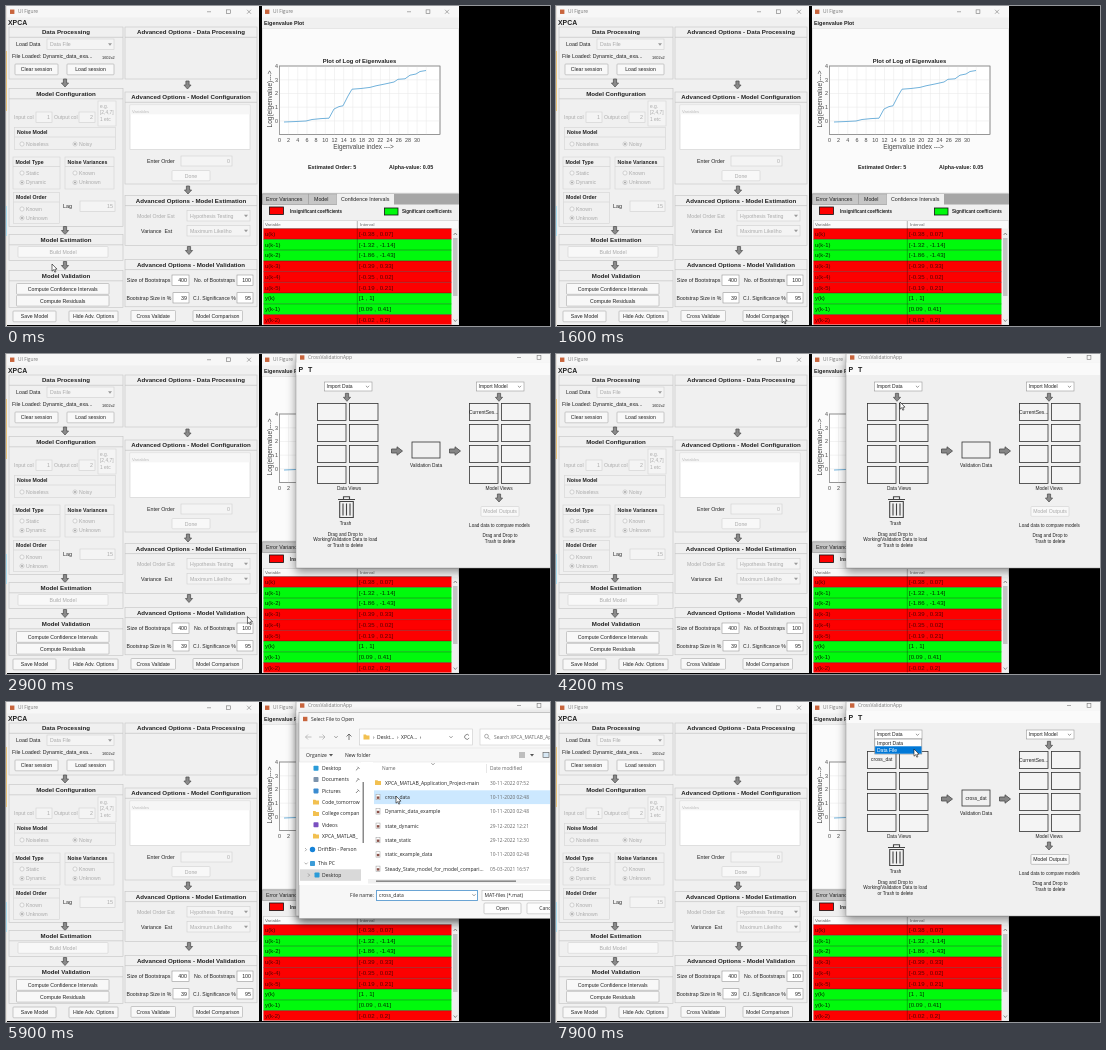
Write an HTML page that moves like this. It is 544x320 px and loops after 8 s.

```html
<!DOCTYPE html>
<html lang="en">
<head>
<meta charset="utf-8">
<title>Model comparison walkthrough</title>
<style>
  html, body { margin: 0; width: 100%; height: 100%; overflow: hidden; background: #000; }
  svg { display: block; width: 100vw; height: 100vh; }
  text { font-family: "Liberation Sans", Arial, sans-serif; white-space: pre; }
  .ui { font-family: "Open Sans", "Noto Sans", sans-serif; }
  .shadow { filter: drop-shadow(0 4px 5px rgba(0, 0, 0, .42)); }
</style>
</head>
<body>
<svg id="stage" viewBox="0 0 544 320"></svg>
<script>
const INK = '#222', DIM = '#aaa', EDGE = '#c4c4c4', FACE = '#f0f0f0';

// Drawing helpers: text is placed by its vertical centre.
const rect = (x, y, w, h, fill = 'none', stroke = 'none', sw = 0.6, rx = 0) =>
  `<rect x="${x}" y="${y}" width="${w}" height="${h}" fill="${fill}" stroke="${stroke}" stroke-width="${sw}" rx="${rx}"/>`;
const path = (d, stroke = INK, fill = 'none', sw = 0.7) =>
  `<path d="${d}" stroke="${stroke}" fill="${fill}" stroke-width="${sw}"/>`;
const text = (s, x, y, { size = 5.3, fill = INK, anchor = 'start', bold = false, ui = false } = {}) =>
  `<text x="${x}" y="${y + size * 0.36}" font-size="${size}" fill="${fill}" text-anchor="${anchor}"` +
  `${bold ? ' font-weight="700"' : ''}${ui ? ' class="ui"' : ''}>${s.replace(/&/g, '&amp;').replace(/</g, '&lt;').replace(/>/g, '&gt;')}</text>`;
const mid = (s, x, y, o = {}) => text(s, x, y, { anchor: 'middle', ...o });
const bold = (s, x, y, size = 5.4) => text(s, x, y, { size, bold: true });
const group = (id, body) => `<g id="${id}" display="none">${body}</g>`;

const triangle = (x, y, fill = '#999') => path(`M${x - 2} ${y - 1}h4l-2 2.6z`, 'none', fill);
const chevron = (x, y) => path(`M${x - 1.6} ${y - 0.8}l1.6 1.6 1.6 -1.6`, '#555', 'none', 0.6);
const downArrow = (x, y) => path(`M${x - 1.6} ${y - 4}h3.2v4h2l-3.6 4 -3.6 -4h2z`, '#4a4a4a', '#8a8a8a', 0.7);
const rightArrow = (x, y) => path(`M${x - 5.5} ${y - 2}h5.5v-2.2l5.5 4.2 -5.5 4.2v-2.2h-5.5z`, '#4a4a4a', '#858585', 0.8);

const button = (s, x, y, w, h = 10.8, fill = INK) =>
  rect(x, y, w, h, '#f8f8f8', fill === DIM ? '#d2d2d2' : '#aaa', 0.6, 0.8) + mid(s, x + w / 2, y + h / 2, { size: 5.2, fill });
const field = (s, x, y, w, h = 10.3, fill = INK) =>
  rect(x, y, w, h, fill === DIM ? '#f4f4f4' : '#fff', fill === DIM ? '#d0d0d0' : '#999') +
  text(s, x + w - 2, y + h / 2, { anchor: 'end', fill });
const disabledMenu = (s, x, y, w, h = 10.5) =>
  rect(x, y, w, h, '#f4f4f4', '#d0d0d0') + text(s, x + 3, y + h / 2, { size: 5.2, fill: DIM }) + triangle(x + w - 4, y + h / 2);
const radio = (s, x, y, on) =>
  `<circle cx="${x}" cy="${y}" r="2.1" fill="#f6f6f6" stroke="#bbb" stroke-width=".6"/>` +
  (on ? `<circle cx="${x}" cy="${y}" r="1.1" fill="#aaa"/>` : '') + text(s, x + 4, y, { size: 5.2, fill: DIM });
const panel = (title, x, y, w, h) =>
  rect(x, y, w, h, 'none', EDGE) + path(`M${x} ${y + 10.3}h${w}`, EDGE) +
  mid(title, x + w / 2, y + 5.2, { size: 6.15, bold: true });
const box = (title, x, y, w, h) =>
  rect(x, y, w, h, 'none', '#d4d4d4') + path(`M${x} ${y + 9.5}h${w}`, '#d4d4d4') + bold(title, x + 2.5, y + 5, 5.2);

const titleBar = (s, x, y, w, h, buttons) => {
  const c = y + h / 2;
  const [a, b, z] = buttons;
  return rect(x, y, w, h, '#f7f7f7') + rect(x + 3, c - 2.2, 4.4, 4.4, '#c8643c') +
    text(s, x + 11, c, { size: 4.85, fill: '#777', ui: true }) +
    path(`M${a - 2} ${c}h4`, '#777', 'none', 0.6) + rect(b - 1.9, c - 1.9, 3.8, 3.8, 'none', '#777') +
    path(`M${z - 2} ${c - 2}l4 4m0 -4l-4 4`, '#777', 'none', 0.6);
};

const desktopEdge = () => rect(0, 0, 1, 320, '#e6e2dc') + rect(0, 45, 1, 60, '#e8c27a') + rect(0, 200, 1, 30, '#a9dcee');

function optionsWindow() {
  const dim = { size: 5.2, fill: DIM };
  return rect(1, 0, 252, 319, FACE) + titleBar('UI Figure', 1, 0, 252, 11.5, [203, 222.5, 243]) +
    bold('XPCA', 2, 17, 6.9) +
    panel('Data Processing', 3, 21, 114, 52) +
    text('Load Data', 10, 38) + disabledMenu('Data File', 41, 33, 67) +
    text('File Loaded: Dynamic_data_exa...', 6, 50.5) + text('1602x2', 96, 51.5, { size: 3.9 }) +
    button('Clear session', 9, 58, 43) + button('Load session', 61, 58, 47) + downArrow(59, 77) +

    panel('Model Configuration', 3, 82.5, 114, 138) +
    text('Input col', 8, 111, dim) + field('1', 30, 106, 16, 10.3, DIM) +
    text('Output col', 48, 111, dim) + field('2', 73, 106, 16, 10.3, DIM) +
    rect(92, 95, 18, 25, '#f4f4f4', '#d4d4d4') +
    ['e.g.', '[2,4,7]', '1 etc'].map((s, i) => text(s, 94, 100 + i * 6.5, { size: 4.9, fill: DIM })).join('') +
    box('Noise Model', 8.5, 121.5, 101, 22) + radio('Noiseless', 16, 138) + radio('Noisy', 69, 138, true) +
    box('Model Type', 7, 151, 47, 32) + radio('Static', 16, 167) + radio('Dynamic', 16, 176.5, true) +
    box('Noise Variances', 59, 151, 49, 32) + radio('Known', 69, 167) + radio('Unknown', 69, 176.5, true) +
    box('Model Order', 7.5, 186.5, 46, 31) + radio('Known', 16, 203) + radio('Unknown', 16, 212, true) +
    text('Lag', 57, 200) + field('15', 74, 195, 35, 10.5, DIM) + downArrow(59, 224.5) +

    panel('Model Estimation', 3, 228.5, 114, 26) + button('Build Model', 12, 240.5, 90, 10.8, DIM) + downArrow(59, 259.5) +
    panel('Model Validation', 3, 264.5, 114, 37) +
    button('Compute Confidence Intervals', 10.5, 277.5, 92.5) + button('Compute Residuals', 10.5, 289.3, 92.5) +
    button('Save Model', 7, 305, 43) + button('Hide Adv. Options', 63, 305, 49) +

    panel('Advanced Options - Data Processing', 119, 21, 132, 52) + downArrow(181.5, 79) +
    panel('Advanced Options - Model Configuration', 119, 86, 132, 92) +
    rect(124, 99, 120, 44.5, '#fff', '#d0d0d0') + rect(124.3, 99.3, 119.4, 9, '#f6f6f6') + text('Variables', 126, 105, { size: 4.2, fill: '#bbb' }) +
    text('Enter Order', 141, 155) + field('0', 175, 150, 51, 10, DIM) +
    button('Done', 166, 164.5, 38, 10.3, DIM) + downArrow(182, 184) +
    panel('Advanced Options - Model Estimation', 119, 189.3, 132, 50) +
    text('Model Order Est', 131, 210, dim) + disabledMenu('Hypothesis Testing', 181, 204.5, 63) +
    text('Variance  Est', 135, 225) + disabledMenu('Maximum Likeliho', 181, 219.5, 63) + downArrow(183, 244.5) +
    panel('Advanced Options - Model Validation', 119, 253.3, 132, 47.5) +
    text('Size of Bootstraps', 120.8, 274, { size: 5.4 }) + field('400', 166, 269, 17) +
    text('No. of Bootstraps', 188, 274) + field('100', 231, 269, 16) +
    text('Bootstrap Size in %', 120.5, 292, { size: 5.15 }) + field('39', 167, 286.7, 16) +
    text('C.I. Significance %', 187, 292, { size: 5.1 }) + field('95', 231, 286.7, 16) +
    button('Cross Validate', 125, 304.5, 44.5) + button('Model Comparison', 187, 304.5, 49.5) +
    group('hover', rect(187, 304.5, 49.5, 10.8, '#cfe4f4', '#4a90c8', 0.7, 0.8) + mid('Model Comparison', 211.75, 309.9, { size: 5.2 }));
}

function plot() {
  const tickX = k => 273.4 + k * 4.59, tickY = v => 114.9 - v * 13.7;
  let s = rect(273.4, 60, 160.6, 68.6, '#fff', '#777', 0.5);
  for (let k = 0; k <= 32; k += 2) {
    s += path(`M${tickX(k)} 60v68.6`, '#e6e6e6', 'none', 0.5) + (k < 31 ? mid(`${k}`, tickX(k), 133.8, { size: 5.4, fill: '#444' }) : '');
  }
  for (let v = 0; v <= 4; v++) {
    s += path(`M273.4 ${tickY(v)}h160.6`, '#e6e6e6', 'none', 0.5) + text(`${v}`, 272, tickY(v), { size: 5.4, fill: '#444', anchor: 'end' });
  }
  const curve = 'M278 116L288 115.6 300 115 306 113.5 315 112.6 323 112.2 328 103 333 100.6 337 99.8 342 90 346 83.2 ' +
    '355 82.5 364 81.4 370 79.8 378 78.2 388 76 392 73.3 399 72.8 404 69.2 410 68 414 65.5 420 64.5';
  return s + rect(273.4, 60, 160.6, 68.6, 'none', '#777', 0.5) + path(curve, '#4f9fd2', 'none', 0.8) +
    mid('Plot of Log of Eigenvalues', 353.5, 55, { size: 5.85, bold: true }) +
    mid('Eigenvalue index --->', 357.5, 140.5, { size: 6.4, fill: '#444' }) +
    `<g transform="translate(264 93) rotate(-90)">${mid('Log(eigenvalue)--->', 0, 0, { size: 6.5, fill: '#444' })}</g>`;
}

function resultsWindow() {
  const rows = [
    ['u(k)', '[-0.38 , 0.07]', 0], ['u(k-1)', '[-1.32 , -1.14]', 1], ['u(k-2)', '[-1.86 , -1.43]', 1],
    ['u(k-3)', '[-0.39 , 0.33]', 0], ['u(k-4)', '[-0.35 , 0.02]', 0], ['u(k-5)', '[-0.19 , 0.21]', 0],
    ['y(k)', '[1 , 1]', 1], ['y(k-1)', '[0.09 , 0.41]', 1], ['y(k-2)', '[-0.02 , 0.2]', 0]];
  const table = rows.map(([name, range, good], i) => {
    const y = 222.6 + i * 10.75, h = Math.min(10.75, 318.5 - y), fill = good ? '#032803' : '#500';
    return rect(257.5, y, 188, h, good ? '#00fa0c' : '#fd0000') + path(`M257.5 ${y}h188`, '#0007', 'none', 0.7) +
      text(name, 259, y + 5.2, { size: 5.9, fill }) + text(range, 353, y + 5.2, { size: 6.1, fill });
  }).join('');
  return rect(256, 0, 197, 319, FACE) + titleBar('UI Figure', 256, 0, 197, 11.5, [403, 422, 441]) +
    bold('Eigenvalue Plot', 258, 17) + rect(256.5, 22.5, 196, 164.5, '#fbfbfb', '#ddd') + plot() +
    bold('Estimated Order: 5', 302, 161) + bold('Alpha-value: 0.05', 383, 161) +
    rect(256, 187.5, 197, 11, '#a6a6a6') + rect(256.5, 188, 46, 10.5, '#c6c6c6', '#999', 0.5) +
    rect(302.5, 188, 28.5, 10.5, '#c6c6c6', '#999', 0.5) + rect(331, 188, 57, 11, FACE) +
    text('Error Variances', 260, 193) + text('Model', 308, 193) + text('Confidence Intervals', 335, 193) +
    rect(263.5, 201, 14, 7.5, '#f00', '#111', 0.8) + bold('Insignificant coefficients', 284, 205, 4.45) +
    rect(378.5, 202, 13.5, 7, '#00f80c', '#111', 0.8) + bold('Significant coefficients', 396, 205.3, 4.55) +
    rect(257.5, 214.5, 195, 104, '#fafafa', '#ccc') + text('Variable', 259, 218.7, { size: 4.4, fill: '#666' }) +
    text('Interval', 354, 218.7, { size: 4.4, fill: '#666' }) + table + path('M351.3 215v103.5', '#0007', 'none', 0.6) +
    rect(446, 222.6, 6.5, 96, '#efefef') + rect(447, 232, 4.5, 58, '#c4c4c4') +
    path('M447.6 229l1.7 -2 1.7 2', '#666') + path('M447.6 313.5l1.7 2 1.7 -2', '#666');
}

const appFrame = () => `<g class="shadow">${rect(290, -1, 276, 215, FACE, '#999', 0.5)}</g>` +
  titleBar('CrossValidationApp', 291, -1.5, 275, 10, [513, 533, 553]);

function appContent() {
  const cells = x => [0, 1, 2, 3].map(r =>
    [0, 32].map(dx => rect(x + dx, 49.5 + r * 21, 28.5, 17, '#f4f4f4', '#333', 0.8)).join('')).join('');
  const menu = (s, x) => rect(x, 28, 47.5, 9, '#fff', '#999') + text(s, x + 2, 32.6, { size: 5 }) + chevron(x + 43, 32.6);
  const small = { size: 4.6 };
  const trash = path('M332 145.5h17M337.5 145.3v-2.6h6v2.6M333.7 147.5h13.6v16h-13.6zM337 149.5v12M340.5 149.5v12M344 149.5v12', '#444', 'none', 1.1);
  return rect(290.5, 8.5, 275, 12.5, '#fafafa') + bold('P', 292.5, 15, 7) + bold('T', 302, 15, 7) +
    menu('Import Data', 318.5) + menu('Import Model', 470.5) + downArrow(341, 43.3) + downArrow(493, 43.3) +
    cells(311.5) + cells(463.5) + mid('CurrentSes...', 477.7, 57.7, { size: 5 }) +
    rightArrow(391, 97) + rightArrow(449, 97) + rect(406, 88, 28, 16, FACE, '#333', 0.8) +
    mid('Validation Data', 420, 111, { size: 4.8 }) + mid('Data Views', 343, 134.5, { size: 4.8 }) + mid('Model Views', 493, 134.5, { size: 4.8 }) +
    trash + mid('Trash', 339.5, 169, small) +
    mid('Drag and Drop to', 339.3, 180, small) + mid('Working/Validation Data to load', 339.3, 185.7, small) + mid('or Trash to delete', 339.3, 191.3, small) +
    downArrow(493, 144) + button('Model Outputs', 475, 152.5, 38, 9.8, DIM) +
    mid('Load data to compare models', 493.5, 171.5, small) + mid('Drag and Drop to', 494, 181.5, small) + mid('Trash to delete', 494, 187.3, small) +
    group('loaded', mid('cross_dat', 325.7, 57.7, { size: 4.9 })) +
    group('validated', mid('cross_dat', 420, 96, { size: 4.9 }) + button('Model Outputs', 475, 152.5, 38, 9.8)) +
    group('popup', rect(318.8, 37, 47, 15, '#fff', '#777', 0.6) + text('Import Data', 321, 41, { size: 5 }) +
      rect(319.1, 44.3, 46.4, 7.4, '#0078d7') + text('Data File', 321, 48, { size: 5, fill: '#fff' }));
}

function fileDialog() {
  const ui = { ui: true, size: 5 }, soft = { ui: true, size: 4.85, fill: '#666' };
  const folder = (x, y) => path(`M${x - 3} ${y - 2.4}h2.4l.8 .8h2.8v4h-6z`, 'none', '#f2c050');
  const page = (x, y) => rect(x - 2, y - 2.7, 4, 5.4, '#fff', '#999', 0.5) + rect(x - 1.2, y - 0.6, 2.6, 2.4, '#8a5048');
  const pin = y => path(`M351.5 ${y - 1.5}l2 2m-1 -1l-2.6 2.6`, '#777', 'none', 0.9);
  const openButton = (fill, edge) => rect(478, 201, 37, 10.8, fill, edge, 0.7, 1) + mid('Open', 496.5, 206.3, ui);
  const places = [['Desktop', '#2a9bd8'], ['Documents', '#7c93ac'], ['Pictures', '#3a8bd0'], ['Code_tomorrow', 0], ['College compan', 0], ['Videos', '#7a50c0'], ['XPCA_MATLAB_', 0]];
  const files = [['XPCA_MATLAB_Application_Project-main', '30-11-2022 07:52'], ['cross_data', '10-11-2020 02:48'],
    ['Dynamic_data_example', '10-11-2020 02:48'], ['state_dynamic', '29-12-2022 12:21'], ['state_static', '29-12-2022 12:30'],
    ['static_example_data', '10-11-2020 02:48'], ['Steady_State_model_for_model_compari...', '05-03-2021 16:57']];
  const badge = (x, y, fill) => rect(x - 2.5, y - 2.5, 5, 5, fill, 'none', 0, 0.8);
  return `<g class="shadow">${rect(293, 10.5, 275, 206, '#f7f7f7', '#999', 0.5)}</g>` + rect(293.3, 60, 274, 123, '#fff') +
    rect(297, 14.8, 4.4, 4.4, '#c8643c') + text('Select File to Open', 305, 17, ui) +
    path('M305.5 35h-6m2.5 -2.5l-2.5 2.5 2.5 2.5', '#aaa') + path('M313 35h6m-2.5 -2.5l2.5 2.5 -2.5 2.5', '#aaa') +
    chevron(330, 35) + path('M343 38v-6m-2.5 2.5l2.5 -2.5 2.5 2.5', '#444') +
    rect(353.5, 27, 113, 16, '#fff', '#ccc') + folder(360.5, 35) + text('›  Deskt...  ›  XPCA...  ›', 367, 35, ui) + chevron(445, 35) +
    path('M463 33.5a2.4 2.4 0 1 0 .2 2.4', '#555') + rect(474, 27, 90, 16, '#fff', '#ccc') +
    `<circle cx="480.5" cy="34.2" r="1.9" fill="none" stroke="#777" stroke-width=".6"/>` + path('M482 35.7l1.8 1.8', '#777') +
    text('Search XPCA_MATLAB_Applic', 488, 35, soft) +
    path('M293 46h275M293 60h275', '#ddd', 'none', 0.5) + text('Organize', 300, 53, ui) + triangle(325, 53, '#555') + text('New folder', 339, 53, ui) +
    [0, 1, 2].map(i => path(`M513 ${51 + i * 2}h6`, '#555')).join('') + triangle(526, 53, '#555') + rect(537, 50.5, 6, 5, '#d8e8f4', '#555') +
    rect(294, 167.3, 63, 11.5, '#d9d9d9') +
    places.map(([s, c], i) => (c ? badge(310, 66.3 + i * 11.3, c) : folder(310, 66.3 + i * 11.3)) + text(s, 316, 66.3 + i * 11.3, ui)).join('') +
    [66.3, 77.6, 88.9].map(pin).join('') +
    `<circle cx="306.5" cy="147.5" r="2.7" fill="#1683d8"/>` + text('DriftBin - Person', 312, 147.5, ui) +
    badge(306.5, 161.5, '#3c9cd8') + text('This PC', 312, 161.5, ui) + badge(311, 173, '#2a9bd8') + text('Desktop', 316, 173, ui) +
    path('M299 146l1.6 1.6 -1.6 1.6M298.5 160.6l1.6 1.6 1.6 -1.6M302 171.5l1.6 1.6 -1.6 1.6', '#777', 'none', 0.6) +
    rect(355, 60, 12, 123, '#fff') + rect(356.5, 80, 1.5, 61, '#8a8a8a') +
    text('Name', 376, 66, soft) + chevron(427, 62) + text('Date modified', 484, 66, soft) + path('M480.5 62v9', '#ddd') +
    group('selected', rect(368, 88.3, 190, 13.8, '#cce8ff')) +
    files.map(([name, date], i) => (i ? page : folder)(372, 80.7 + i * 14.35) +
      text(name, 379, 80.9 + i * 14.35, { ui: true, size: 5.03 }) + text(date, 484, 80.9 + i * 14.35, soft)).join('') +
    rect(362, 177, 204, 4.5, '#f0f0f0') + rect(370, 178.4, 140, 1.6, '#8a8a8a') +
    mid('File name:', 356, 193, ui) + rect(370.5, 188.5, 101, 10, '#fff', '#5b9bd0', 0.9) + chevron(468, 193) +
    group('fileName', text('cross_data', 373, 193.3, ui)) +
    rect(476, 188.5, 88, 10, '#fff', '#bbb') + text('MAT-files (*.mat)', 478.5, 193, ui) +
    openButton('#fdfdfd', '#bbb') + group('openHover', openButton('#e0effa', '#1478c8')) +
    rect(521, 201, 40, 10.8, '#fdfdfd', '#bbb', 0.6, 1) + mid('Cancel', 541, 206.3, ui);
}

const cursorShape = '<g id="cursor"><path d="M0 0V7.2L1.7 5.7 2.8 8.2 3.9 7.7 2.8 5.3 5 5.1Z" fill="#fff" stroke="#111" stroke-width=".6"/></g>';
const stage = document.getElementById('stage');
stage.innerHTML = rect(0, 0, 544, 320, '#000') + desktopEdge() + optionsWindow() + resultsWindow() +
  group('app', appFrame() + group('content', appContent())) + group('dialog', fileDialog()) + cursorShape;

const $ = id => document.getElementById(id);
const show = (id, on) => $(id).setAttribute('display', on ? 'inline' : 'none');
const clamp = v => Math.max(0, Math.min(1, v));

// [time, x, y] of the pointer tip.
const route = [[0, 46, 258], [300, 120, 290], [800, 307, 319], [1100, 290, 318], [1700, 221, 309], [2700, 221, 309],
  [3300, 300, 130], [3800, 344, 36], [4200, 344, 48], [4400, 344, 46], [4700, 346, 48], [5100, 393, 107], [5400, 392, 100], [5600, 390, 94],
  [5900, 390, 94], [6300, 476, 203], [6700, 476, 203], [7000, 328, 58], [7300, 420, 95], [7400, 420, 95], [7650, 360, 33], [7900, 358, 47], [8000, 358, 47]];

function pointer(t) {
  const i = route.findIndex(p => p[0] > t);
  const [t0, x0, y0] = route[i - 1], [t1, x1, y1] = route[i];
  const u = (t - t0) / (t1 - t0), e = u * u * (3 - 2 * u);
  return [x0 + (x1 - x0) * e, y0 + (y1 - y0) * e];
}

function fade(id, amount, cx, cy, shrink) {
  const k = 1 - shrink * (1 - amount);
  show(id, amount > 0);
  $(id).setAttribute('opacity', amount);
  $(id).setAttribute('transform', `translate(${cx} ${cy}) scale(${k}) translate(${-cx} ${-cy})`);
}

function draw(t) {
  const within = (a, b) => t >= a && t < b;
  show('hover', within(1700, 2000));
  fade('app', clamp((t - 2010) / 200), 428, 105, 0.145);
  show('content', t >= 2600);
  show('popup', within(4300, 4600) || t >= 7700);
  const opening = clamp((t - 4600) / 200), closing = clamp((6700 - t) / 200);
  fade('dialog', Math.min(opening, closing), 410, 105, 0.05);
  show('selected', t >= 5600);
  show('fileName', t >= 5700);
  show('openHover', t >= 6200);
  show('loaded', t >= 6800);
  show('validated', t >= 7300);
  $('cursor').setAttribute('transform', `translate(${pointer(t)})`);
}

function tick(now) {
  draw(Math.floor((now % 8000) / 100) * 100);
  requestAnimationFrame(tick);
}
draw(0);
requestAnimationFrame(tick);
</script>
</body>
</html>
```
